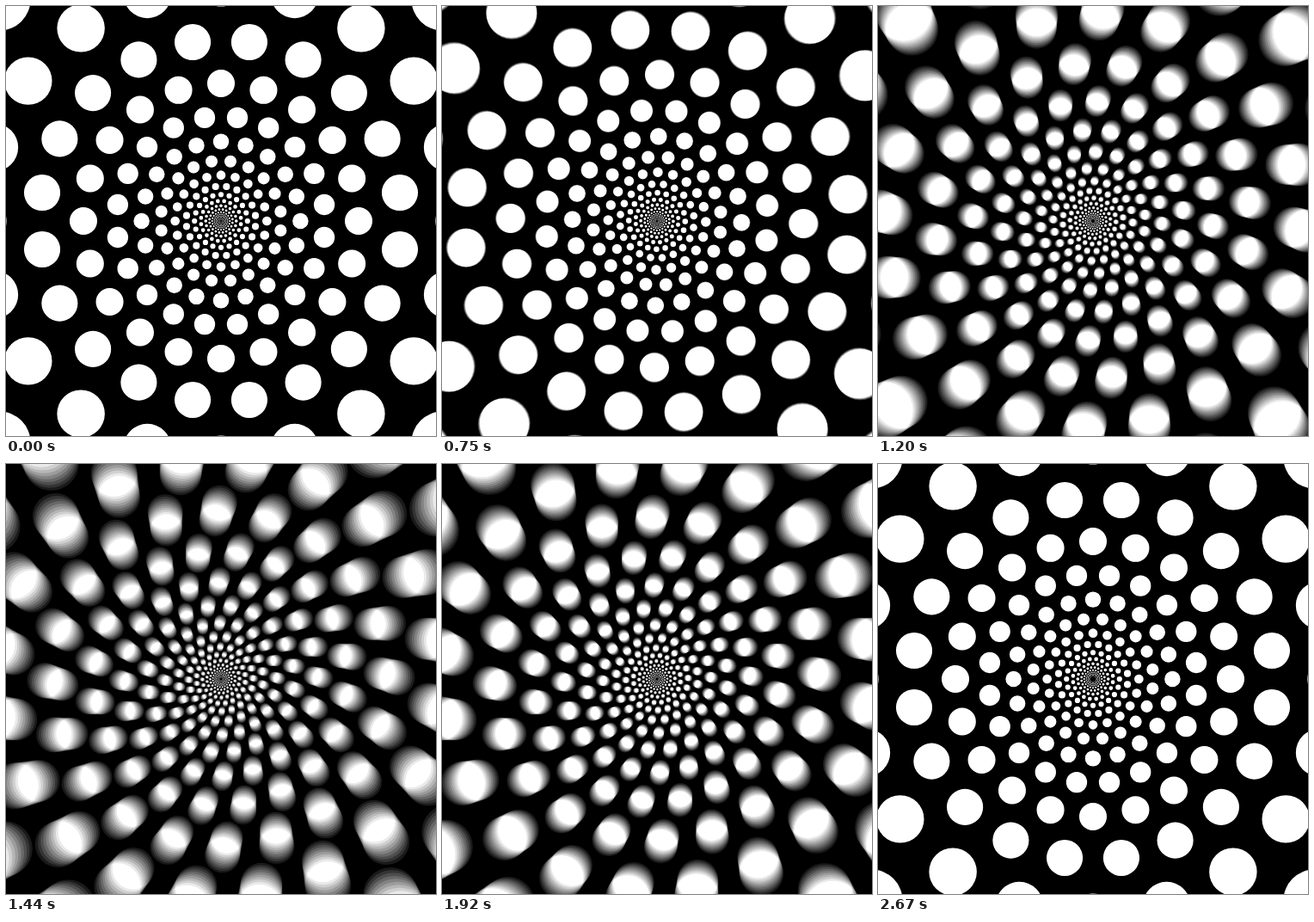
Write an HTML page with a canvas that moves like this. It is 500 px wide and 500 px high and loops after 2.7 s.

```html
<!DOCTYPE html>
<html lang="en">
<head>
<meta charset="utf-8">
<title>Spiral zoom</title>
<style>
  html, body { margin: 0; width: 100%; height: 100%; overflow: hidden; background: #000; }
  canvas { display: block; width: 500px; height: 500px; }
</style>
</head>
<body>
<canvas id="stage" width="500" height="500"></canvas>
<script>
const ctx = document.getElementById("stage").getContext("2d");

const LOOP = 2700;
const STEP = 30;
const SHUTTER = 26;   // exposure time in ms, for the motion blur
const SAMPLES = 10;
const CYCLES = 4;     // each cycle scales by 3 and turns by one dot
const DOTS = 20;
const BASE = 160;
const DOT_RATIO = 0.1;

// Time warp: [ms, progress], joined by a smooth cubic.
const KNOTS = [[0, 0], [495, 0.0865], [975, 0.2252], [1455, 0.4333],
               [1725, 0.5753], [2205, 0.809], [2700, 1]];

const spans = KNOTS.slice(1).map(([t, v], i) => {
  const width = t - KNOTS[i][0];
  return { width, slope: (v - KNOTS[i][1]) / width };
});

const tangents = KNOTS.map((_, i) => {
  const a = spans[i - 1], b = spans[i];
  return a && b ? (b.width * a.slope + a.width * b.slope) / (a.width + b.width) : 0;
});
const last = KNOTS.length - 1;
tangents[0] = (3 * spans[0].slope - tangents[1]) / 2;
tangents[last] = (3 * spans[last - 1].slope - tangents[last - 1]) / 2;

function warp(ms) {
  const t = Math.min(LOOP, Math.max(0, ms));
  let i = 0;
  while (i < last - 1 && t > KNOTS[i + 1][0]) i++;
  const { width, slope } = spans[i];
  const u = (t - KNOTS[i][0]) / width;
  const m0 = tangents[i], m1 = tangents[i + 1];
  return KNOTS[i][1] + width * u *
    (m0 + u * (3 * slope - 2 * m0 - m1 + u * (m0 + m1 - 2 * slope)));
}

const smooth = v => v ** 4 * (35 - 84 * v + 70 * v * v - 20 * v ** 3);

function drawDots(phase) {
  ctx.beginPath();
  for (let ring = -18; ring <= 4; ring++) {
    const radius = BASE * 3 ** (ring / 4 + phase);
    if (radius > 400) break;
    const size = radius * DOT_RATIO;
    for (let i = 0; i < DOTS; i++) {
      const angle = (i + ring / 2 + phase) * 2 * Math.PI / DOTS;
      const x = 250 + radius * Math.cos(angle);
      const y = 250 + radius * Math.sin(angle);
      ctx.moveTo(x + size, y);
      ctx.arc(x, y, size, 0, 2 * Math.PI);
    }
  }
  ctx.fill();
}

function render(ms) {
  ctx.globalCompositeOperation = "source-over";
  ctx.globalAlpha = 1;
  ctx.fillStyle = "#000";
  ctx.fillRect(0, 0, 500, 500);

  ctx.globalCompositeOperation = "lighter";
  ctx.globalAlpha = 1 / SAMPLES;
  ctx.fillStyle = "#fff";
  for (let i = 0; i < SAMPLES; i++) {
    const offset = ((i + 0.5) / SAMPLES - 0.5) * SHUTTER;
    drawDots(CYCLES * smooth(warp(ms + STEP / 2 + offset)) % 1);
  }
}

const start = performance.now();
let shown = -1;

function tick() {
  const elapsed = (performance.now() - start) % LOOP;
  const time = Math.floor(elapsed / STEP) * STEP;
  if (time !== shown) render(shown = time);
  requestAnimationFrame(tick);
}
tick();
</script>
</body>
</html>
```
